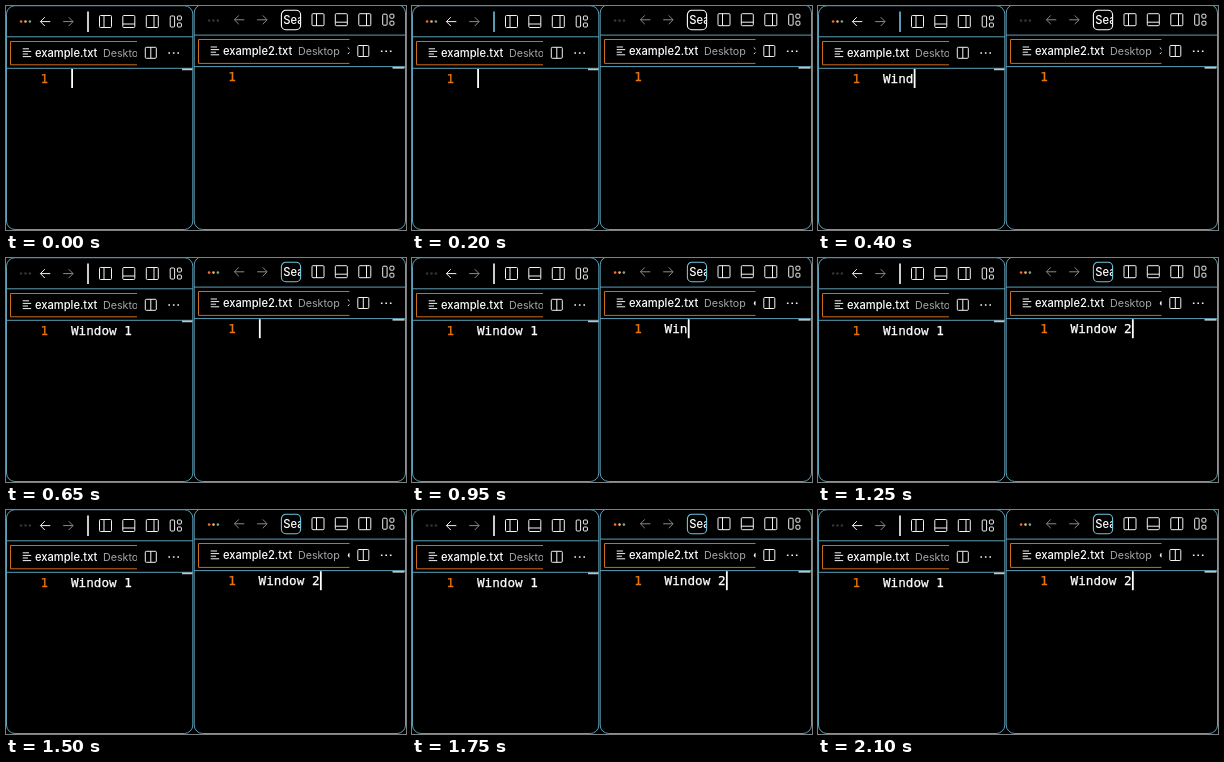
Animation of 400x224 px, one loop 2.2 s. Source, as an HTML page:

```html
<!DOCTYPE html>
<html lang="en">
<head>
<meta charset="utf-8">
<title>Two editor windows</title>
<style>
  html, body { margin: 0; width: 100%; height: 100%; overflow: hidden; background: #000; }
  svg { display: block; width: 400px; height: 224px; }
  .edge { fill: none; stroke: #5c9fb7; stroke-width: 1; }
  .icon { fill: none; stroke: #f2f2f2; stroke-width: 1; stroke-linejoin: round; }
  .dim { stroke: #8a8a8a; }
  .tab { fill: none; stroke: #c96c1c; stroke-width: 1; }
  .ui { font: 500 11.15px Inter, sans-serif; fill: #fff; }
  .ui .path { font-size: 10.7px; font-weight: 400; fill: #a6a6a6; }
  .code { font: 12.67px "DejaVu Sans Mono", monospace; fill: #fff; stroke: #fff; stroke-width: .25; white-space: pre; }
  .code .num { fill: #e8740c; stroke: #e8740c; }
  .caret { fill: #fff; }
  .lights { fill: #333; }
  .on .lights :nth-child(1) { fill: #f0701f; }
  .on .lights :nth-child(2) { fill: #f0b56c; }
  .on .lights :nth-child(3) { fill: #78a894; }
  .search { fill: none; stroke: #fff; stroke-width: 1.1; }
  .hot .search { stroke: #6fc3df; }
  .win:not(.on) .caret { display: none; }
  .mark { stroke: #c4c4c4; stroke-width: 1.7; }
  .dirty .close, .win:not(.dirty) .dot { display: none; }
</style>
</head>
<body>
<svg viewBox="0 0 400 224">
  <defs>
    <clipPath id="clip1"><path d="M0 33H131V62H0Z"/></clipPath>
    <clipPath id="clip2"><path d="M0 33H155.5V62H0Z"/></clipPath>
    <clipPath id="clipS"><path d="M276 0H294.3V28H276Z"/></clipPath>
    <g id="left" class="icon">
      <path d="M16.7 42.8H23M16.7 45.4H25.2M16.7 48H22M16.7 50.6H25.2"/>
    </g>
    <g id="right" class="icon">
      <rect x="93.5" y="9.5" width="12" height="12" rx="1"/>
      <path d="M98 9.5V21.5"/>
      <rect x="116.8" y="9.5" width="12" height="12" rx="1"/>
      <path d="M116.8 18H128.8"/>
      <rect x="140.3" y="9.5" width="12" height="12" rx="1"/>
      <path d="M148 9.5V21.5"/>
      <rect x="164.2" y="10" width="4.4" height="11" rx="1"/>
      <rect x="171.4" y="10" width="4" height="4" rx="1"/>
      <rect x="171.4" y="17" width="4" height="4" rx="1"/>
      <rect x="139.3" y="41.3" width="11" height="11" rx="1"/>
      <path d="M144.8 41.3V52.3"/>
      <path d="M162.4 47H164M166.9 47H168.5M171.4 47H173" stroke-width="1.5"/>
    </g>
    <g id="lamps">
      <circle cx="15.1" cy="15.5" r="1.3"/><circle cx="19.5" cy="15.5" r="1.3"/><circle cx="23.9" cy="15.5" r="1.3"/>
    </g>
    <path id="back" d="M44.3 15.6H34.5M38.8 11.2L34.4 15.6L38.8 20"/>
    <path id="next" d="M57.2 15.6H67M62.7 11.2L67.1 15.6L62.7 20"/>
  </defs>

  <g class="win" id="w1">
    <rect class="edge" x=".5" y="-.3" width="186.3" height="223.8" rx="8.5"/>
    <path class="edge" d="M.5 30.8H187M.5 62.3H187"/>
    <g class="lights">
      <circle cx="15.1" cy="15.5" r="1.3"/><circle cx="19.5" cy="15.5" r="1.3"/><circle cx="23.9" cy="15.5" r="1.3"/>
    </g>
    <use href="#back" class="icon"/>
    <use href="#next" class="icon dim"/>
    <path class="search" d="M82 5.5V26" style="stroke-width:1.6"/>
    <use href="#right"/>
    <path class="tab" d="M131 35.5H4.5V58.8H131"/>
    <use href="#left"/>
    <text class="ui" x="29" y="51.2" clip-path="url(#clip1)">example.txt<tspan class="path" x="97">Desktop</tspan></text>
    <path class="mark" d="M176 63.4H186.4"/>
    <text class="code" y="76.6"><tspan class="num" x="34.5">1</tspan><tspan class="typed" x="65"></tspan></text>
    <rect class="caret" x="65.2" y="63" width="1.8" height="19"/>
  </g>

  <g class="win" id="w2">
    <rect class="edge" x="188.2" y="-1.5" width="211.3" height="225" rx="8.5"/>
    <path class="edge" d="M188 29.1H400M188 60.6H400"/>
    <g transform="translate(188 -1.8)">
      <g class="lights" transform="translate(0 .9)">
        <circle cx="15.1" cy="15.5" r="1.3"/><circle cx="19.5" cy="15.5" r="1.3"/><circle cx="23.9" cy="15.5" r="1.3"/>
      </g>
      <g transform="translate(6)">
        <use href="#back" class="icon dim"/>
        <use href="#next" class="icon dim"/>
      </g>
      <path class="tab" d="M155.5 35.3H4.5V59.2H155.5"/>
      <use href="#left"/>
      <g clip-path="url(#clip2)">
        <text class="ui" x="29" y="51.2">example2.txt<tspan class="path" x="104">Desktop</tspan></text>
        <path class="icon close" d="M153.8 43.3L160.4 49.9M160.4 43.3L153.8 49.9"/>
        <circle class="dot" cx="156.5" cy="47" r="2.6" fill="#fff"/>
      </g>
      <text class="code" y="76.7"><tspan class="num" x="34.2">1</tspan><tspan class="typed" x="64.6"></tspan></text>
      <rect class="caret" x="64.9" y="63" width="1.8" height="19"/>
    </g>
    <rect class="search" x="275.4" y="4.2" width="19.2" height="19.6" rx="4.5"/>
    <text class="ui" x="277.3" y="18" clip-path="url(#clipS)">Search</text>
    <use href="#right" x="212.5" y="-1.8"/>
    <path class="mark" d="M386.5 61.8H398.5"/>
  </g>
</svg>
<script>
  const LOOP = 2200, KEY = 50, ADVANCE = 7.63, SWITCH = 645;
  const wins = [
    { id: "w1", text: "Window 1", from: 245, hot: 45, on: t => t < SWITCH },
    { id: "w2", text: "Window 2", from: 845, hot: SWITCH, on: t => t >= SWITCH }
  ];

  for (const w of wins) {
    w.el = document.getElementById(w.id);
    w.typed = w.el.querySelector(".typed");
    w.caret = w.el.querySelector(".caret");
  }

  function draw(t) {
    for (const w of wins) {
      const count = Math.max(0, Math.min(w.text.length, Math.floor((t - w.from) / KEY) + 1));
      const on = w.on(t);
      w.typed.textContent = w.text.slice(0, count);
      w.caret.setAttribute("transform", `translate(${count * ADVANCE})`);
      w.el.classList.toggle("on", on);
      w.el.classList.toggle("hot", on && t >= w.hot);
      w.el.classList.toggle("dirty", count > 0);
    }
  }

  const start = performance.now();
  function tick() {
    draw((performance.now() - start) % LOOP);
    requestAnimationFrame(tick);
  }
  tick();
</script>
</body>
</html>
```
